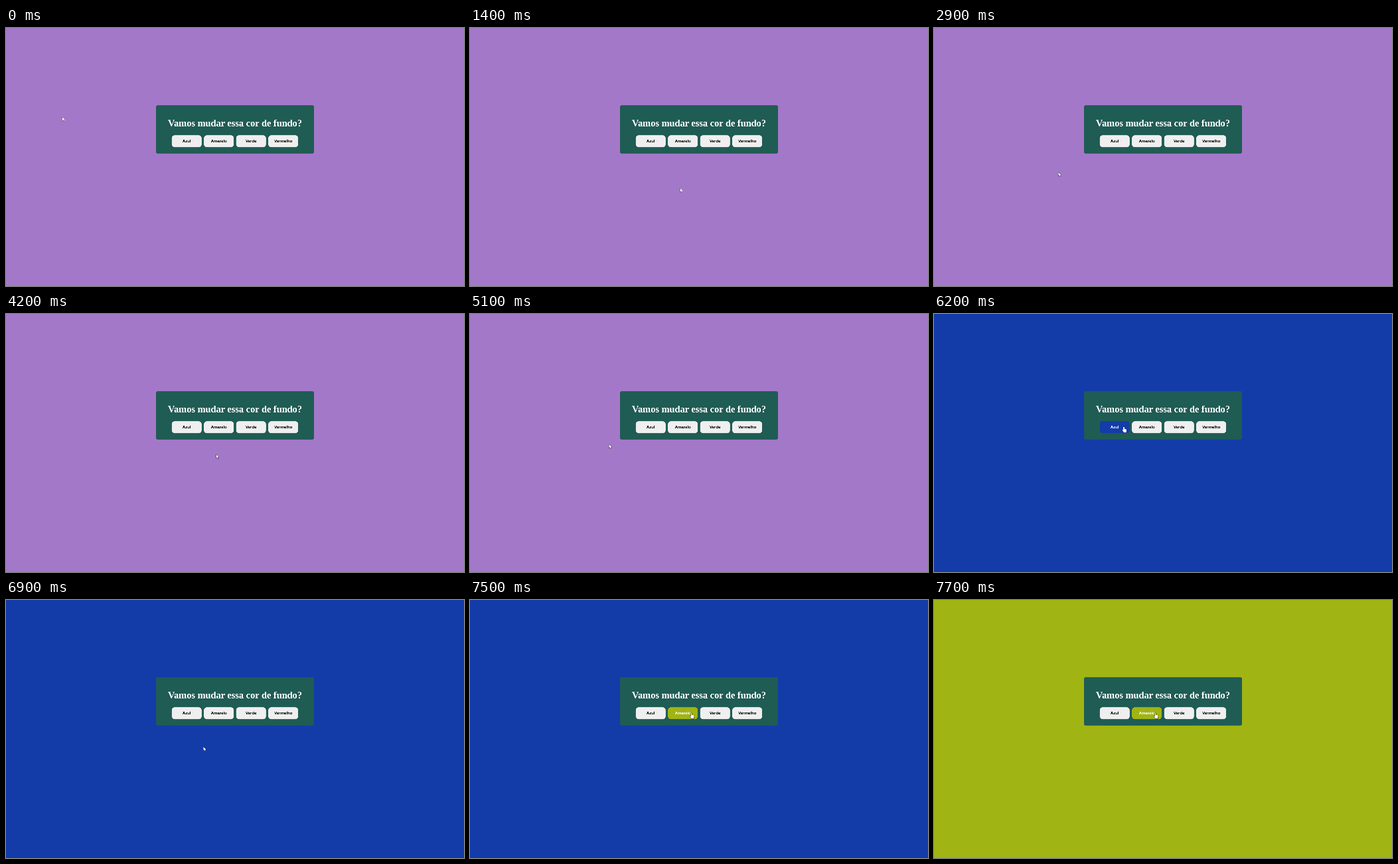
Write an HTML page with a canvas that moves like this. It is 690x388 px and loops after 8000 ms.

```html
<!DOCTYPE html>
<html lang="pt-BR">
<head>
<meta charset="utf-8">
<title>Vamos mudar essa cor de fundo?</title>
<style>
  html, body { margin: 0; width: 100%; height: 100%; overflow: hidden; background: #a478c8; }
  canvas { display: block; width: 100vw; height: 100vh; }
</style>
</head>
<body>
<canvas id="stage"></canvas>
<script>
const WIDTH = 690, HEIGHT = 388, LOOP = 8000, STEP = 100;
const OVERSAMPLE = 4; // soft, unsnapped edges once scaled down
const PURPLE = '#a478c8', BLUE = '#133ca9', YELLOW = '#a0b414';
const PANEL = '#1f5c54', LIGHT = '#efefef';

const canvas = document.getElementById('stage');
canvas.width = WIDTH * OVERSAMPLE;
canvas.height = HEIGHT * OVERSAMPLE;
const ctx = canvas.getContext('2d');
ctx.scale(OVERSAMPLE, OVERSAMPLE);
ctx.textAlign = 'center';
ctx.textRendering = 'geometricPrecision';

const buttons = [
  ['Azul', BLUE], ['Amarelo', YELLOW], ['Verde', '#1f8a3c'], ['Vermelho', '#b01e1e']
].map(([label, color], i) => ({ label, color, x: 249.7 + i * 48.5, y: 161.3, w: 45, h: 18 }));

const point = (x, y) => ({ x, y });
const home = point(85, 134);

// Each sweep curves from the previous resting point past "via"; gaps are pauses.
const sweeps = [
  { start: 0, end: 200, via: point(176, 98), to: point(268, 61) },
  { start: 300, end: 1200, via: point(680, 20), to: point(571, 52) },
  { start: 1200, end: 1400, via: point(444, 146), to: point(317, 241) },
  { start: 2100, end: 2900, via: point(-55, 415), to: point(187.5, 217) },
  { start: 2900, end: 3800, via: point(256, 145), to: point(325, 213) },
  { start: 4100, end: 5100, via: point(285, 205), to: point(209.5, 196) },
  { start: 5100, end: 5900, via: point(225, 130), to: point(286, 169.5) },
  { start: 6600, end: 7500, via: point(300, 285), to: point(333.5, 169.5) }
];

const bezier = (a, b, c, u) => (1 - u) ** 2 * a + 2 * u * (1 - u) * b + u * u * c;

function pointerAt(t) {
  let from = home;
  for (const { start, end, via, to } of sweeps) {
    if (t <= start) break;
    if (t < end) {
      const u = (t - start) / (end - start);
      return point(bezier(from.x, via.x, to.x, u), bezier(from.y, via.y, to.y, u));
    }
    from = to;
  }
  return from;
}

const backgroundAt = t => t < 6200 ? PURPLE : t < 7700 ? BLUE : YELLOW;

function roundBox(x, y, w, h, r, color) {
  ctx.fillStyle = color;
  ctx.beginPath();
  ctx.roundRect(x, y, w, h, r);
  ctx.fill();
}

function text(str, x, y, font, color) {
  ctx.font = font;
  ctx.fillStyle = color;
  ctx.fillText(str, x, y);
}

function outlined(shape, { x, y }) {
  ctx.save();
  ctx.translate(x, y);
  ctx.lineWidth = 0.7;
  ctx.lineJoin = 'round';
  ctx.strokeStyle = '#2a2433';
  ctx.fillStyle = '#fff';
  ctx.stroke(shape);
  ctx.fill(shape);
  ctx.restore();
}

const arrow = new Path2D('M0 0V5.4L1.3 4.2L2.2 6.3L3 5.9L2.2 3.9H3.9Z');
const hand = new Path2D('M-.7 .6Q0 -.3 .7 .6V3.4L3.2 3.9Q4.2 4.1 4.2 5.2' +
  'L3.6 7.4V8.8H-.4V7.7L-2 5.5Q-2.2 4.4 -1.2 4.8L-.7 5.4Z');

function draw(t) {
  const p = pointerAt(t);
  const hovered = buttons.find(b =>
    p.x >= b.x && p.x <= b.x + b.w && p.y >= b.y && p.y <= b.y + b.h);

  ctx.fillStyle = backgroundAt(t);
  ctx.fillRect(0, 0, WIDTH, HEIGHT);
  roundBox(226, 116.3, 238, 72.4, 2.3, PANEL);
  text('Vamos mudar essa cor de fundo?', WIDTH / 2, 147.75,
    'bold 14.37px "Liberation Serif", "Times New Roman", serif', '#fff');

  for (const b of buttons) {
    const active = b === hovered;
    roundBox(b.x, b.y, b.w, b.h, 4.5, active ? b.color : LIGHT);
    text(b.label, b.x + b.w / 2, 172.1,
      'bold 6px "Liberation Sans", Arial, sans-serif', active ? '#fff' : '#000');
  }
  outlined(hovered ? hand : arrow, p);
}

const start = performance.now();
function tick() {
  const t = (performance.now() - start) % LOOP;
  draw(Math.floor(t / STEP) * STEP);
  requestAnimationFrame(tick);
}
tick();
</script>
</body>
</html>
```
